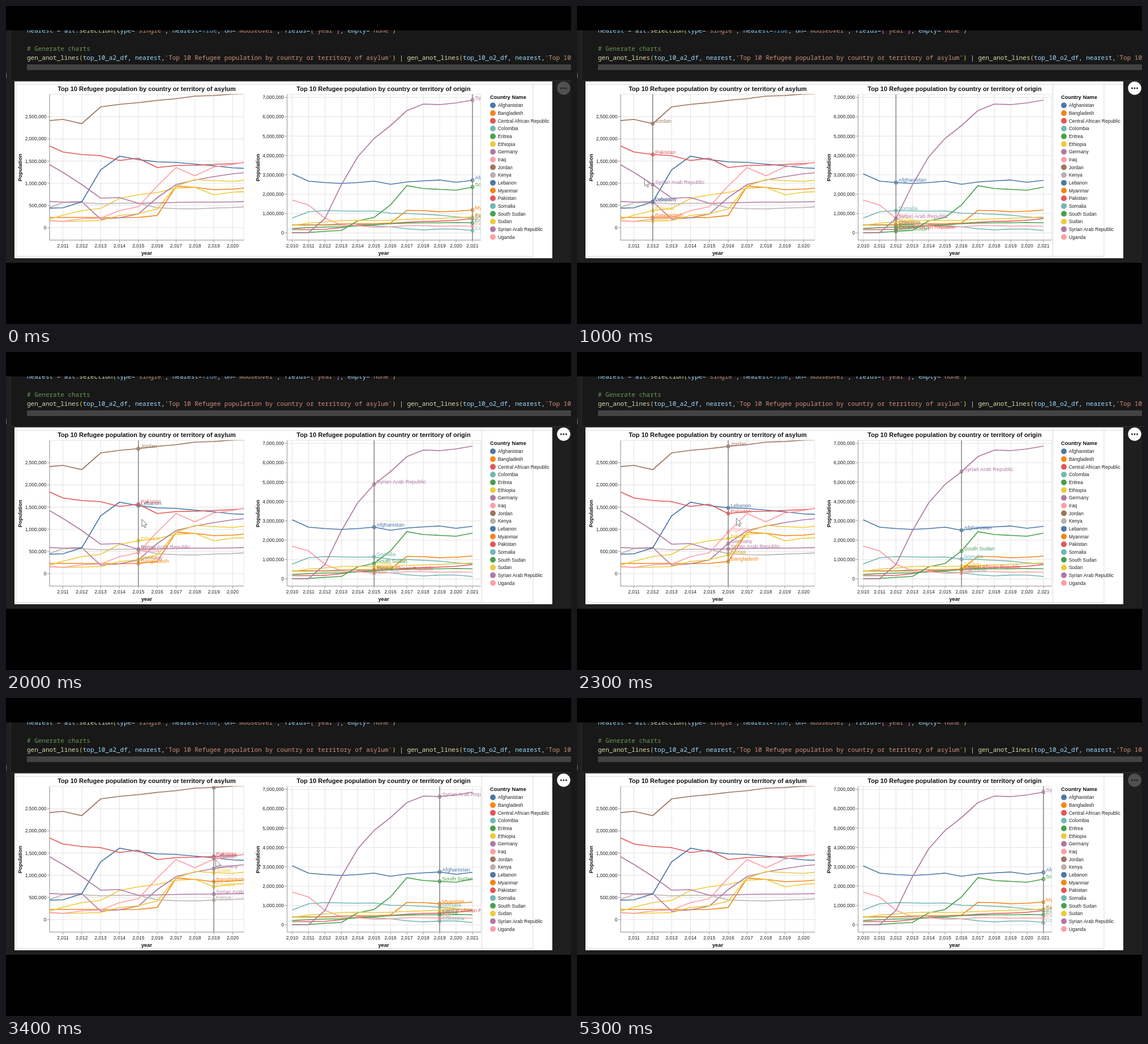
Write an HTML page that moves like this. It is 998 px wide and 561 px high and loops after 5600 ms.

```html
<!DOCTYPE html>
<html lang="en">
<head>
<meta charset="utf-8">
<title>Refugee population charts</title>
<style>
html, body { margin: 0; width: 100%; height: 100%; overflow: hidden; background: #000; }
svg { display: block; width: 998px; height: 561px; }
text { font: 8.5px "Liberation Sans", Arial, sans-serif; fill: #222; }
.code { font: 10.97px "Noto Sans Mono", "DejaVu Sans Mono", monospace; white-space: pre; }
.title { font-size: 11.05px; font-weight: bold; fill: #111; }
.head { font-size: 9.35px; font-weight: bold; fill: #111; }
.mark { font-size: 9.35px; }
</style>
</head>
<body>
<svg id="stage" viewBox="0 0 998 561"></svg>
<script>
const LOOP = 5600, STEP = 100;
const TOP = 156, BOTTOM = 413;
const PALETTE = ['#4c78a8', '#f58518', '#e45756', '#72b7b2', '#48a14d',
                 '#eeca3b', '#b279a2', '#ff9da6', '#9d755d', '#bab0ac'];
const COUNTRIES = ['Afghanistan', 'Bangladesh', 'Central African Republic', 'Colombia', 'Eritrea',
  'Ethiopia', 'Germany', 'Iraq', 'Jordan', 'Kenya', 'Lebanon', 'Myanmar', 'Pakistan', 'Somalia',
  'South Sudan', 'Sudan', 'Syrian Arab Republic', 'Uganda'];
const colorOf = name => PALETTE[COUNTRIES.indexOf(name) % PALETTE.length];

// Heights on the stage, one per year from 2010 to 2021
const asylum = {
  'Bangladesh': [373, 373, 373, 373, 373.5, 373, 369.5, 318, 320, 324, 323, 320],
  'Ethiopia': [379, 369, 361, 357, 339.5, 333, 329, 321.5, 320, 333, 328.5, 327],
  'Germany': [344.5, 346, 345, 376, 373.5, 367, 338, 315, 307, 301, 296, 293],
  'Jordan': [203, 200, 207.5, 178, 173.5, 170.5, 166.5, 163.5, 159, 158, 155.5, 154],
  'Kenya': [359, 347, 347, 349, 348, 348, 356, 357.5, 358, 356.5, 355.5, 353.5],
  'Lebanon': [357, 356, 345.5, 289, 265, 271, 275, 276, 279, 282, 285.5, 287],
  'Pakistan': [242.5, 257.5, 262, 264, 272.5, 268.5, 285, 281.5, 281, 279.5, 278, 275],
  'Sudan': [378, 380, 379.5, 378.5, 369.5, 366.5, 358, 318, 306, 308, 309.5, 306],
  'Syrian Arab Republic': [274.5, 293.5, 315, 339, 338, 348, 347.5, 346.5, 346, 346, 345.5, 345],
  'Uganda': [378, 380, 375.5, 374, 361, 354, 317.5, 285, 299.5, 284, 279.5, 273]
};
const origin = {
  'Afghanistan': [296, 309, 311.5, 313, 311.5, 309, 314.5, 310.5, 308.5, 307, 311, 307.5],
  'Central African Republic': [394.5, 394.5, 394, 391, 386, 386, 383.5, 381.5, 380, 379.5, 378, 375],
  'Colombia': [386.5, 386.5, 386.5, 386.5, 387, 388, 389.5, 393, 395, 393.5, 393.5, 396],
  'Eritrea': [392.5, 391, 390, 389.5, 388, 386, 384, 383, 382.5, 382.5, 382, 382.5],
  'Iraq': [342.5, 351, 374.5, 386, 387.5, 390.5, 389.5, 387.5, 387.5, 388.5, 388, 388.5],
  'Myanmar': [386, 386, 386, 384.5, 384, 384, 383, 360.5, 361, 363, 362, 360],
  'Somalia': [374, 363, 361, 361.5, 362, 361.5, 365.5, 366, 367.5, 369, 372, 374],
  'South Sudan': [400, 399.5, 397.5, 396, 379, 373, 351, 317, 322, 323.5, 325, 319.5],
  'Sudan': [387, 383, 381, 378.5, 378, 378.5, 378, 376.5, 375.5, 374.5, 373.5, 372],
  'Syrian Arab Republic': [400, 400, 375, 315.5, 266, 233.5, 211, 184.5, 173, 174, 171, 166]
};

// [time, selected year index]
const picks = [[0, 11], [500, 1], [1000, 2], [1300, 3], [1500, 4], [1900, 5], [2200, 6],
               [2500, 7], [2800, 8], [3100, 9], [3500, 10], [3900, 11]];
// [time, x, y] of the pointer tip
const path = [[500, 66, 313], [600, 85, 309], [700, 93, 307], [800, 93, 307], [1400, 172, 300],
  [1500, 181, 299], [1600, 181, 299], [2000, 240, 295], [2500, 309, 292], [2600, 309, 292],
  [2700, 324, 291], [3200, 360, 287], [3300, 360, 287], [3600, 391, 282], [3700, 391, 282],
  [4100, 422, 277], [4200, 422, 277], [4500, 446, 277], [5100, 446, 277]];

const stage = document.getElementById('stage');

function add(parent, tag, attrs, text) {
  const el = document.createElementNS('http://www.w3.org/2000/svg', tag);
  for (const key in attrs) el.setAttribute(key, attrs[key]);
  if (text !== undefined) el.textContent = text;
  parent.appendChild(el);
  return el;
}
const rect = (p, x, y, width, height, fill) => add(p, 'rect', { x, y, width, height, fill });
const line = (p, x1, y1, x2, y2, stroke, w = 0.85) =>
  add(p, 'line', { x1, y1, x2, y2, stroke, 'stroke-width': w });
const label = (p, x, y, text, cls = '', anchor = 'start') =>
  add(p, 'text', { x, y, class: cls, 'text-anchor': anchor }, text);

function codeLine(y, tokens) {
  const el = add(stage, 'text', { x: 37, y, class: 'code' });
  for (const [text, fill] of tokens) add(el, 'tspan', { style: 'fill:' + fill }, text);
}

function drawEditor() {
  const name = '#9cdcfe', func = '#dcdcaa', str = '#ce9178', plain = '#d4d4d4', gold = '#e8cf4a';
  rect(stage, 0, 43, 998, 410, '#1f1f1f');
  rect(stage, 8, 43, 990, 88, '#181818');
  line(stage, 8, 43, 8, 131, '#333', 1);
  line(stage, 8, 131.5, 998, 131.5, '#333', 1);
  rect(stage, 0, 118, 1, 9, '#777');
  const arg = (key, value, color = str) => [[key, name], ['=', plain], [value, color]];
  codeLine(46.5, [['nearest', name], [' = ', plain], ['alt', name], ['.', plain], ['selection', func],
    ['(', gold], ...arg('type', "'single'"), [', ', plain], ...arg('nearest', 'True', '#569cd6'),
    [', ', plain], ...arg('on', "'mouseover'"), [', ', plain], ...arg('fields', '[', '#da70d6'),
    ["'year'", str], [']', '#da70d6'], [', ', plain], ...arg('empty', "'none'"), [')', gold]]);
  codeLine(79, [['# Generate charts', '#6a9955']]);
  const call = (frame, title) => [['gen_anot_lines', func], ['(', gold], [frame, name], [', ', plain],
    ['nearest', name], [',', plain], [`'Top 10 Refugee population by country or territory of ${title}'`, str],
    [')', gold]];
  codeLine(95, [...call('top_10_a2_df', 'asylum'), [' | ', plain], ...call('top_10_o2_df', 'origin')]);
  rect(stage, 37, 103, 961, 10, '#434343');
  rect(stage, 0, 0, 998, 43, '#000');
}

function drawPanel() {
  rect(stage, 15, 133, 950, 312, '#fff');
  line(stage, 17, 138.5, 965, 138.5, '#d4d4d4');
  line(stage, 17, 441.5, 931, 441.5, '#d4d4d4');
  line(stage, 17.5, 136, 17.5, 442, '#d4d4d4');
  line(stage, 931, 136, 931, 442, '#d4d4d4');
}

function makeChart({ id, data, left, right, x0, dx, years, zero, unit, tick, ticks, titleX, popX, word }) {
  const xAt = i => x0 + i * dx;
  for (let i = years[0]; i <= years[1]; i++) {
    line(stage, xAt(i), TOP, xAt(i), BOTTOM, '#ddd');
    line(stage, xAt(i), BOTTOM, xAt(i), BOTTOM + 4.2, '#888');
    label(stage, xAt(i), 426, (2010 + i).toLocaleString('en-US'), '', 'middle');
  }
  for (let k = 0; k <= ticks; k++) {
    const y = zero - k * unit;
    line(stage, left, y, right, y, '#ddd');
    line(stage, left - 4.2, y, left, y, '#888');
    label(stage, left - 5.5, y + 3, (k * tick).toLocaleString('en-US'), '', 'end');
  }
  add(stage, 'rect', { x: left, y: TOP, width: right - left, height: BOTTOM - TOP,
    fill: 'none', stroke: '#ddd', 'stroke-width': 0.85 });
  line(stage, left, TOP, left, BOTTOM, '#888');
  line(stage, left, BOTTOM, right, BOTTOM, '#888');
  label(stage, titleX, 150, 'Top 10 Refugee population by country or territory of ' + word, 'title', 'middle');
  label(stage, titleX, 439, 'year', 'head', 'middle');
  label(stage, 0, 0, 'Population', 'head', 'middle')
    .setAttribute('transform', `translate(${popX + 3} 285) rotate(-90)`);

  const clip = add(stage, 'clipPath', { id });
  rect(clip, left, TOP - 0.5, right - left, BOTTOM - TOP + 1);
  const plot = add(stage, 'g', { 'clip-path': `url(#${id})` });
  const names = Object.keys(data);
  for (const name of names) {
    add(plot, 'polyline', { points: data[name].map((y, i) => xAt(i) + ',' + y).join(' '),
      fill: 'none', stroke: colorOf(name), 'stroke-width': 1.7, 'stroke-linejoin': 'miter' });
  }
  const hover = add(plot, 'g', {});
  const dots = names.map(name => add(hover, 'circle',
    { cx: 0, r: 2.6, fill: 'none', stroke: colorOf(name), 'stroke-width': 1.7, opacity: 0.85 }));
  line(hover, 0, TOP, 0, BOTTOM, '#777', 1.3);
  const marks = names.map(name => {
    const el = label(hover, 4.25, 0, name, 'mark');
    el.style.fill = colorOf(name);
    return el;
  });
  return year => {
    hover.setAttribute('transform', `translate(${xAt(year)} 0)`);
    names.forEach((name, i) => {
      dots[i].setAttribute('cy', data[name][year]);
      marks[i].setAttribute('y', data[name][year] - 1.4);
    });
  };
}

function drawLegend() {
  label(stage, 855, 164, 'Country Name', 'head');
  COUNTRIES.forEach((name, i) => {
    const y = 175.3 + 13.66 * i;
    add(stage, 'circle', { cx: 860, cy: y, r: 5, fill: colorOf(name) });
    label(stage, 868.7, y + 3, name);
  });
}

drawEditor();
drawPanel();
const charts = [
  makeChart({ id: 'asylum', data: asylum, left: 77, right: 420, x0: 67.2, dx: 33.32, years: [1, 10],
    zero: 391, unit: 39.13, tick: 500000, ticks: 5, titleX: 248.5, popX: 25, word: 'asylum' }),
  makeChart({ id: 'origin', data: origin, left: 496.5, right: 838.5, x0: 505.5, dx: 28.95, years: [0, 11],
    zero: 400.3, unit: 34.15, tick: 1000000, ticks: 7, titleX: 667, popX: 444.5, word: 'origin' })
];
const edge = line(stage, 840.5, 136, 840.5, 442, '#d4d4d4');
drawLegend();

const button = add(stage, 'circle', { cx: 985, cy: 145, r: 11.7 });
const buttonDots = add(stage, 'g', {});
for (const x of [980.5, 985, 989.5]) add(buttonDots, 'circle', { cx: x, cy: 145, r: 1.5 });
const pointer = add(stage, 'path', { d: 'M0 0V13.2L3 10.4L5 15L7 14.1L5.1 9.6H9.2Z',
  fill: '#fff', stroke: '#666', 'stroke-width': 0.9 });

function pointerAt(t) {
  const i = path.findIndex(p => p[0] > t);
  if (i < 1) return null;
  const [a, b] = [path[i - 1], path[i]];
  const k = (t - a[0]) / (b[0] - a[0]);
  return [a[1] + (b[1] - a[1]) * k, a[2] + (b[2] - a[2]) * k];
}

function render(t) {
  const year = picks.filter(p => p[0] <= t).pop()[1];
  charts.forEach(select => select(year));
  edge.setAttribute('visibility', year === 11 ? 'hidden' : 'visible');
  const tip = pointerAt(t);
  pointer.setAttribute('visibility', tip ? 'visible' : 'hidden');
  if (tip) pointer.setAttribute('transform', `translate(${tip})`);
  button.setAttribute('fill', tip ? '#fff' : '#505050');
  buttonDots.setAttribute('fill', tip ? '#222' : '#1c1c1c');
}

const start = performance.now();
let shown = -1;
function frame() {
  const t = Math.floor((performance.now() - start) % LOOP / STEP) * STEP;
  if (t !== shown) render(shown = t);
  requestAnimationFrame(frame);
}
frame();
</script>
</body>
</html>
```
